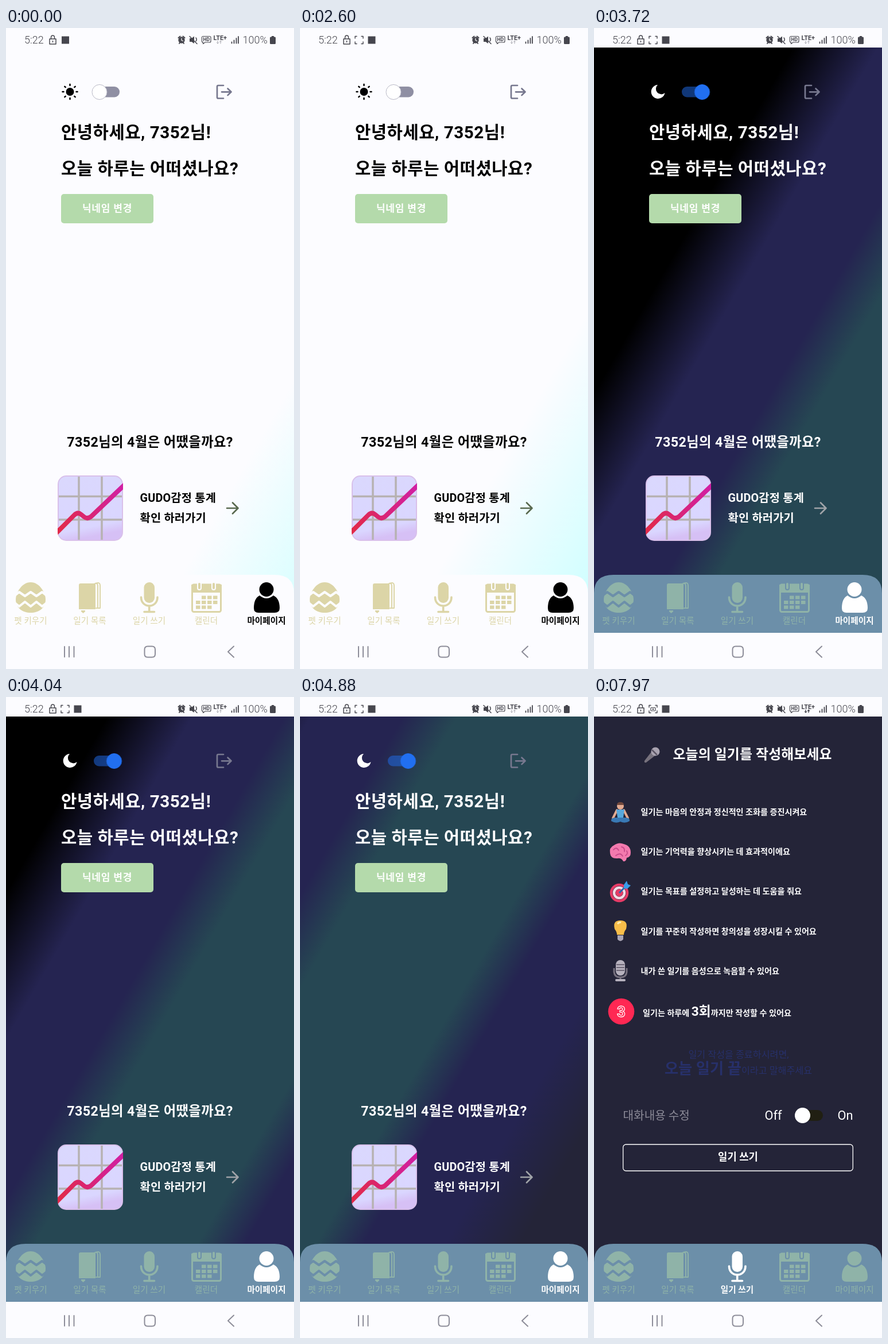
Recreate the animation shown at these times as an HTML page. Size 502 by 1116 pixels, loop 7.99 s.

```html
<!DOCTYPE html>
<html lang="ko">
<head>
<meta charset="utf-8">
<title>Diary app</title>
<style>
html, body { margin: 0; width: 100%; height: 100%; overflow: hidden; background: #fcfcff; }
svg { display: block; width: 502px; height: 1116px; font-family: Roboto, "Noto Sans CJK KR", "Noto Sans CJK", sans-serif; font-weight: 700; }
text { fill: currentColor; white-space: pre; }
.mid { text-anchor: middle; }
.line { fill: none; stroke: currentColor; stroke-linecap: round; stroke-linejoin: round; }

/* One shared 7.99 s timeline: dark theme 33.54%, calendar 63.83%, diary 90.61% */
.light, .dark, .home, .flat, .cal, .diary, .early, .late, .snap, .fg, .arrow, .bar, .cut, .tab {
  animation: 7990ms step-end infinite;
}
.light { animation-name: light; }
.dark { animation-name: dark; }
.home { animation-name: home; }
.flat { animation-name: flat; }
.cal { animation-name: cal; }
.diary { animation-name: diary; }
.early { animation-name: early; }
.late { animation-name: late; }
.snap { animation-name: diary; }
.fg { animation-name: fg; }
.arrow { animation-name: arrow; }
.bar { animation-name: bar; }
.cut { animation-name: cut; }
.tab { animation-name: idle; color: #dcd5a7; }
.tab.me { animation-name: me; }
.tab.month { animation-name: month; }
.tab.write { animation-name: write; }
.glowLight { animation: glowLight 7990ms linear infinite; }
.glowDark { animation: glowDark 7990ms linear infinite; }
.thumb { animation: thumb 7990ms linear infinite; }
.track { animation: track 7990ms linear infinite; }
.hint { animation: hint 7990ms linear infinite; }

@keyframes light { 0% { opacity: 1 } 33.54% { opacity: 0 } }
@keyframes dark { 0% { opacity: 0 } 33.54% { opacity: 1 } }
@keyframes home { 0% { opacity: 1 } 63.83% { opacity: 0 } }
@keyframes flat { 0% { opacity: 0 } 63.83% { opacity: 1 } }
@keyframes cal { 0% { opacity: 0 } 63.83% { opacity: 1 } 90.61% { opacity: 0 } }
@keyframes diary { 0% { opacity: 0 } 90.61% { opacity: 1 } }
@keyframes early { 0% { opacity: 1 } 5% { opacity: 0 } }
@keyframes late { 0% { opacity: 0 } 5% { opacity: 1 } }
@keyframes fg { 0% { color: #000 } 33.54% { color: #fff } }
@keyframes arrow { 0% { color: #59694f } 33.54% { color: #a0a3a8 } }
@keyframes bar { 0% { fill: #fcfcff } 33.54% { fill: #6c8fa9 } }
@keyframes cut { 0% { stroke: #fcfcff } 33.54% { stroke: #6c8fa9 } }
@keyframes idle { 0% { color: #dcd5a7; font-weight: 500 } 33.54% { color: #8fb3a8; font-weight: 400 } }
@keyframes me {
  0% { color: #000; font-weight: 700 } 33.54% { color: #fff; font-weight: 700 }
  63.83% { color: #8fb3a8; font-weight: 400 }
}
@keyframes month {
  0% { color: #dcd5a7; font-weight: 500 } 33.54% { color: #8fb3a8; font-weight: 400 }
  63.83% { color: #fff; font-weight: 700 } 90.61% { color: #8fb3a8; font-weight: 400 }
}
@keyframes write {
  0% { color: #dcd5a7; font-weight: 500 } 33.54% { color: #8fb3a8; font-weight: 400 }
  90.61% { color: #fff; font-weight: 700 }
}
@keyframes glowLight { 0% { transform: translateX(855px) } 33.54%, 100% { transform: translateX(785px) } }
@keyframes glowDark {
  0% { transform: translateX(718px) }
  33.54% { transform: translateX(718px); animation-timing-function: ease }
  89.86%, 100% { transform: translateX(-404px) }
}
@keyframes thumb {
  0%, 33.54% { transform: none; fill: #fff; stroke: #b9b9c6 }
  35.42%, 100% { transform: translateX(25.5px); fill: #216ff0; stroke: #216ff0 }
}
@keyframes track {
  0%, 33.54% { fill: #8f8fa3; fill-opacity: 1 }
  35.42%, 100% { fill: #216ff0; fill-opacity: .5 }
}
@keyframes hint { 0%, 90.61% { opacity: .3 } 99.75%, 100% { opacity: 1 } }
</style>
</head>
<body>
<svg viewBox="0 0 502 1116">
  <defs>
    <linearGradient id="pale" gradientUnits="userSpaceOnUse" x1="0" y1="0" x2="222.6" y2="128.5">
      <stop stop-color="#fcfcff"/><stop offset="1" stop-color="#ceffff"/>
    </linearGradient>
    <linearGradient id="deep" gradientUnits="userSpaceOnUse" x1="0" y1="0" x2="890.3" y2="514">
      <stop offset=".05" stop-color="#000"/>
      <stop offset=".175" stop-color="#252451"/><stop offset=".31" stop-color="#252451"/>
      <stop offset=".39" stop-color="#264753"/><stop offset=".63" stop-color="#264753"/>
      <stop offset=".7" stop-color="#252451"/><stop offset=".82" stop-color="#252451"/>
      <stop offset=".93" stop-color="#242438"/>
    </linearGradient>
    <linearGradient id="trend"><stop stop-color="#e22a45"/><stop offset="1" stop-color="#d01fa8"/></linearGradient>
    <linearGradient id="sheet" x2=".2" y2="1"><stop stop-color="#dad8fd"/><stop offset=".85" stop-color="#dad6ff"/><stop offset="1" stop-color="#d6c0f5"/></linearGradient>
    <clipPath id="card"><rect x="90" y="779" width="114" height="114" rx="15"/></clipPath>
    <g id="face">
      <circle r="11.5" fill="#f2a233"/>
      <path d="M-8 3Q0 7 8 3Q7 11 0 11T-8 3Z" fill="#e22f7a"/>
      <g fill="#fff" stroke="#30243a" stroke-width="1.4"><circle cx="-5" cy="-2" r="4.3"/><circle cx="5" cy="-2" r="4.3"/></g>
      <circle cx="-4.5" cy="-2" r="1.6"/><circle cx="4.5" cy="-2" r="1.6"/>
    </g>
  </defs>

  <rect width="502" height="1116" fill="#fcfcff"/>
  <g class="light"><rect class="glowLight" x="-1000" y="34" width="3000" height="1019" fill="url(#pale)"/></g>
  <g class="dark"><rect class="glowDark" x="-1000" y="34" width="3000" height="1019" fill="url(#deep)"/></g>
  <rect class="flat" y="34" width="502" height="1019" fill="#242438"/>

  <!-- My page -->
  <g class="home">
    <g class="fg">
      <g class="light">
        <circle cx="111.500" cy="111" r="7"/>
        <g id="rays" class="line" stroke-width="2.500"></g>
      </g>
      <path class="dark" d="M111 99A12 12 0 1 0 123.500 113A8.500 8.500 0 0 1 111 99Z" fill="#fff"/>
      <text x="96" y="192" font-size="29.700" letter-spacing=".5">안녕하세요, 7352님!</text>
      <text x="96" y="255" font-size="29.700" letter-spacing=".5">오늘 하루는 어떠셨나요?</text>
      <text class="mid" x="251" y="729" font-size="23.300" letter-spacing=".4">7352님의 4월은 어땠을까요?</text>
      <text x="233.500" y="825" font-size="19.800" letter-spacing=".2">GUDO감정 통계</text>
      <text x="233.500" y="860" font-size="19.800" letter-spacing=".2">확인 하러가기</text>
    </g>
    <rect class="track" x="153" y="102" width="45" height="18.500" rx="9"/>
    <circle class="thumb" cx="163" cy="111.500" r="13" stroke-width="1"/>
    <path class="line" color="#77788f" stroke-width="2.700" d="M379 100H370Q368 100 368 102V120.500Q368 122.500 370 122.500H379M376 111.300H392M386.500 105.500l6 5.800l-6 5.800"/>
    <rect x="96" y="289" width="161" height="51" rx="5" fill="#b4daab"/>
    <text class="mid" x="176.500" y="320" font-size="17" letter-spacing=".8" color="#fff">닉네임 변경</text>
    <g clip-path="url(#card)">
      <rect x="90" y="779" width="114" height="114" fill="url(#sheet)"/>
      <path d="M127 779V893M167 779V893M90 815.500H204M90 856H204" stroke="#b7b2b2" stroke-width="3.500"/>
      <rect x="91" y="780" width="112" height="112" rx="14" fill="none" stroke="#d9c0ea" stroke-width="2"/>
      <path d="M86 881L119 848Q125 842 131 847L136 851Q142 856 149 850L209 793" fill="none" stroke="url(#trend)" stroke-width="8"/>
    </g>
    <g class="arrow"><path class="line" stroke-width="2.600" d="M385 836H404M395 826.500L404.500 836L395 845.500"/></g>
  </g>

  <!-- Calendar -->
  <g class="cal" color="#fff">
    <rect x="87" y="86" width="27.500" height="28" rx="6" fill="#e1e0f6"/>
    <path d="M87 95V92Q87 86 93 86H108.500Q114.500 86 114.500 92V95Z" fill="#2779e6"/>
    <path d="M93.500 100H109M93.500 107H109" stroke="#7891cf" stroke-width="3.500" stroke-dasharray="3.500 2.500"/>
    <text x="137.500" y="108" font-size="23.900" letter-spacing=".1">감정 캘린더를 확인해보세요</text>
    <path d="M58 206.500h32v32h-32ZM412 206.500h31.500v32h-31.500Z" fill="#b4d9ab"/>
    <path class="line" stroke-width="2.700" d="M77.500 216.500l-6 6l6 6M425 216.500l6 6l-6 6"/>
    <text class="mid" x="251" y="234" font-size="31.500">2024. 4</text>
    <g id="days" class="mid"></g>
  </g>

  <!-- Diary -->
  <g class="diary" color="#fff">
    <path d="M88 111L102 93L109 100L91 114Q87 115 88 111Z" fill="#77727d"/>
    <circle cx="107" cy="95" r="7.500" fill="#a9a3b0"/>
    <path d="M101 92l9 9" stroke="#5c5665" stroke-width="2.500"/>
    <text x="137.500" y="108" font-size="23.900" letter-spacing=".1">오늘의 일기를 작성해보세요</text>

    <circle cx="46" cy="190" r="6" fill="#e3ab91"/>
    <path d="M40 188Q40 183 46 183T52 188Z" fill="#72483c"/>
    <path d="M40 197L33 211M52 197L59 211" stroke="#e3ab91" stroke-width="4" stroke-linecap="round"/>
    <path d="M39 196H53L51 210H41Z" fill="#58a9dd"/>
    <path d="M30 216Q29 210 37 210H55Q63 210 62 216Q54 221 46 217Q38 221 30 216Z" fill="#3979b4"/>

    <path d="M28 272Q26 262 35 258Q43 252 52 256Q64 259 64 271Q64 279 57 280Q56 287 51 286Q48 280 41 281Q29 282 28 272Z" fill="#f37aae"/>
    <path class="line" color="#c94b8b" stroke-width="1.800" d="M34 266Q39 260 43 267M48 261Q54 262 53 269M38 276Q46 270 50 277M57 268Q60 273 55 276"/>

    <g fill="none" stroke-width="4.500"><circle cx="44" cy="341" r="14" stroke="#e63b66"/><circle cx="44" cy="341" r="9" stroke="#f3dce6"/></g>
    <circle cx="44" cy="341" r="6.500" fill="#e63b66"/>
    <path d="M44 341L58 327" stroke="#2569b0" stroke-width="3"/>
    <path d="M52 327L57 320L59 326L64 328L58 334L52 333Z" fill="#399be8"/>

    <path d="M40 414Q40 409 36 404Q32 389 46 389T56 404Q52 409 52 414Z" fill="#f8bd49"/>
    <path d="M41 395Q44 391 47 393" stroke="#ffedb0" stroke-width="3" fill="none"/>
    <path d="M41 415H51V422Q46 428 41 422Z" fill="#aaa6b5"/>

    <rect x="38" y="458" width="16" height="27" rx="8" fill="#b6b1bd"/>
    <path d="M39 466H53M39 471H53M39 476H53" stroke="#6f6878" stroke-width="2"/>
    <path d="M35 472V479Q36 488 46 488T57 479V472M46 488V494" fill="none" stroke="#77717f" stroke-width="3"/>
    <rect x="37" y="491" width="18" height="4" rx="2" fill="#b6b1bd"/>

    <g id="tips" font-size="14.100"></g>
    <circle cx="47.500" cy="547.500" r="22.800" fill="#ff2853"/>
    <text class="mid" x="47.500" y="557" font-size="26" style="fill:none" stroke="#fff" stroke-width="1.300">3</text>
    <text x="85" y="555" font-size="14.100">일기는 하루에 <tspan font-size="22.700">3회</tspan>까지만 작성할 수 있어요</text>
    <g class="hint mid" color="#27306a" font-weight="400" font-size="16.200">
      <text x="252" y="628">일기 작성을 종료하시려면,</text>
      <text x="251.500" y="656"><tspan font-size="26.300" font-weight="700">오늘 일기 끝</tspan>이라고 말해주세요</text>
    </g>
    <g font-weight="400">
      <text x="50.500" y="735.500" font-size="20.200" color="#8c8b98">대화내용 수정</text>
      <text x="297.500" y="736" font-size="21.800">Off</text>
      <text x="424.500" y="736" font-size="21.800">On</text>
    </g>
    <rect x="353" y="719" width="46" height="19" rx="9.500" fill="#201f12"/>
    <circle cx="363.500" cy="728.500" r="13.500" fill="#fff"/>
    <rect x="50.700" y="779" width="400.600" height="46" rx="5" fill="none" stroke="#fff" stroke-width="1.300"/>
    <text class="mid" x="251" y="807" font-size="17.800">일기 쓰기</text>
  </g>

  <!-- Tab bar -->
  <path class="bar" d="M0 1053V984Q0 952 34 952H468Q502 952 502 984V1053Z"/>
  <g class="mid" font-size="14.600">
    <g class="tab">
      <path fill="currentColor" d="M43 965C59 965 69 984 69 995C69 1010 57 1018 43 1018S17 1010 17 995C17 984 27 965 43 965Z"/>
      <path class="cut" fill="none" stroke-width="4" stroke-linejoin="round" d="M13 990l10-8l10 7l10-7l10 7l10-7l10 8M13 999l10 8l10-8l10 8l10-8l10 8l10-8"/>
      <text x="43" y="1037">펫 키우기</text>
    </g>
    <g class="tab">
      <path fill="currentColor" d="M130 967H156V1012H127V970Q127 967 130 967ZM131 1014H138V1016L134.500 1019L131 1016Z"/>
      <path class="line" stroke-width="2" d="M157 967Q164 964 164 971V1010H157M154 968Q159 964 160 971V1009"/>
      <text x="146" y="1037">일기 목록</text>
    </g>
    <g class="tab write">
      <rect x="240.500" y="965" width="18.500" height="36" rx="9.200" fill="currentColor"/>
      <path class="line" stroke-width="3.600" d="M235.500 991C235.500 1011 264 1011 264 991M249.700 1007V1015M241 1016.500H258.500"/>
      <text x="249.500" y="1037">일기 쓰기</text>
    </g>
    <g class="tab month">
      <rect class="line" x="324.500" y="969" width="50" height="47.500" rx="3" stroke-width="3"/>
      <path fill="currentColor" d="M323 969H376V983H323Z"/>
      <path class="cut" stroke-width="8" stroke-linecap="round" d="M337 968V975M362 968V975"/>
      <path class="line" stroke-width="4" d="M337 968V975M362 968V975"/>
      <path stroke="currentColor" stroke-width="6" stroke-dasharray="7.500 2.500" d="M341 991.500H368.500M331 1000H368.500M331 1008.500H358.500"/>
      <text x="349" y="1037">캘린더</text>
    </g>
    <g class="tab me">
      <circle cx="454" cy="977.500" r="12.500" fill="currentColor"/>
      <path fill="currentColor" d="M442 988Q454 998 466 988Q477 993 477 1010Q477 1018 468 1018H440Q432 1018 432 1010Q432 993 442 988Z"/>
      <text x="454" y="1037">마이페이지</text>
    </g>
  </g>

  <!-- System bars -->
  <path class="line" color="#8d8d99" stroke-width="2" d="M102 1077V1095M110 1077V1095M118.500 1077V1095M247 1076.500H254.500Q260 1076.500 260 1082V1090Q260 1095.500 254.500 1095.500H247Q241.500 1095.500 241.500 1090V1082Q241.500 1076.500 247 1076.500ZM397 1076.500L387 1086L397 1095.500"/>
  <g color="#46464e" font-weight="300">
    <text x="32" y="27" font-size="18">5:22</text>
    <text x="412.500" y="27" font-size="18">100%</text>
    <path class="line" stroke-width="1.500" d="M76 19H87V28H76ZM78.500 19V16.500Q78.500 13 81.500 13T84.500 16.500V19M81.500 22.500V24.500"/>
    <rect class="early" x="97" y="14.500" width="13" height="13" fill="#46464e"/>
    <g class="late">
      <rect x="118.500" y="14.500" width="13" height="13" fill="#46464e"/>
      <path class="line" stroke-width="1.400" d="M99 14.500H96V18M107 14.500H110V18M96 24V27.500H99M110 24V27.500H107"/>
    </g>
    <g class="snap"><rect class="line" x="99" y="18.500" width="8" height="5.500" rx="1" stroke-width="1.200"/><circle cx="103" cy="21.200" r="1.300" fill="#46464e"/></g>
    <circle cx="306" cy="21" r="5.700" fill="#46464e"/>
    <path class="line" stroke-width="2" d="M300.500 17l3-2.500M311.500 17l-3-2.500M302 27l1-1.500M310 27l-1-1.500"/>
    <path class="line" color="#fff" stroke-width="1.200" d="M306 18V21.500L308.500 22.500"/>
    <path fill="#46464e" d="M320 18H323.500L328 14.500V27L323.500 24H320Z"/>
    <path class="line" stroke-width="1.500" d="M320 14.500L333 27.500M331 17Q333.500 20 331 23"/>
    <path class="line" stroke-width="1.200" d="M343 14.500H355Q357 14.500 357 16.500V23Q357 25 355 25H347L343.500 27.500V25Q341.500 25 341.500 23V16.500Q341.500 14.500 343 14.500Z"/>
    <text class="mid" x="349.200" y="23" font-size="8.500" font-weight="700">HD</text>
    <text x="361.500" y="20.500" font-size="10.800" font-weight="700">LTE+</text>
    <path class="line" color="#a5a5ad" stroke-width="1" d="M369 22.500V27M367.500 25.500l1.500 1.500l1.500-1.500M374 27V22.500M372.500 24l1.500-1.500l1.500 1.500"/>
    <path class="line snap" stroke-width="1.200" d="M369 22.500V27M367.500 25.500l1.500 1.500l1.500-1.500M374 27V22.500M372.500 24l1.500-1.500l1.500 1.500"/>
    <path class="line" stroke-width="1.800" d="M393.500 24.500V26.500M397.500 21.500V26.500M401.500 18V26.500M405 15V26.500"/>
    <path fill="#46464e" d="M463 14H467V15.500H468.500Q470 15.500 470 17V26.500Q470 28 468.500 28H461.500Q460 28 460 26.500V17Q460 15.500 461.500 15.500H463Z"/>
  </g>
</svg>
<script>
const byId = id => document.getElementById(id);
const label = (x, y, size, color, str) =>
  `<text x="${x}" y="${y}" font-size="${size}" color="${color}">${str}</text>`;

byId('rays').innerHTML = Array.from({ length: 8 }, (_, i) =>
  `<path d="M111.500 100V98" transform="rotate(${i * 45} 111.500 111)"/>`).join('');

const dayColor = col => col === 0 ? '#e3154f' : col === 6 ? '#4b6cff' : '#fff';
const colX = col => 68 + col * 61;
let days = [...'일월화수목금토'].map((d, i) => label(colX(i), 287, 20, dayColor(i), d)).join('');
for (let i = 0; i < 35; i++) {
  const col = i % 7, x = colX(col), y = 351.5 + Math.floor(i / 7) * 83.7;
  const outside = i === 0 || i > 30;
  const marked = i === 1 || i === 2;
  if (marked) days += `<ellipse cx="${x}" cy="344" rx="18.500" ry="25" fill="#fdd4a4"/><use href="#face" x="${x}" y="317.500"/>`;
  const color = outside ? '#8a8997' : marked ? '#000' : dayColor(col);
  days += label(x, y, 21.3, color, i === 0 ? 31 : i > 30 ? i - 30 : i);
}
byId('days').innerHTML = days;

byId('tips').innerHTML = [
  '일기는 마음의 안정과 정신적인 조화를 증진시켜요',
  '일기는 기억력을 향상시키는 데 효과적이에요',
  '일기는 목표를 설정하고 달성하는 데 도움을 줘요',
  '일기를 꾸준히 작성하면 창의성을 성장시킬 수 있어요',
  '내가 쓴 일기를 음성으로 녹음할 수 있어요'
].map((tip, i) => label(81.5, 204.5 + i * 69.4, 14.1, '#fff', tip)).join('');
</script>
</body>
</html>
```
